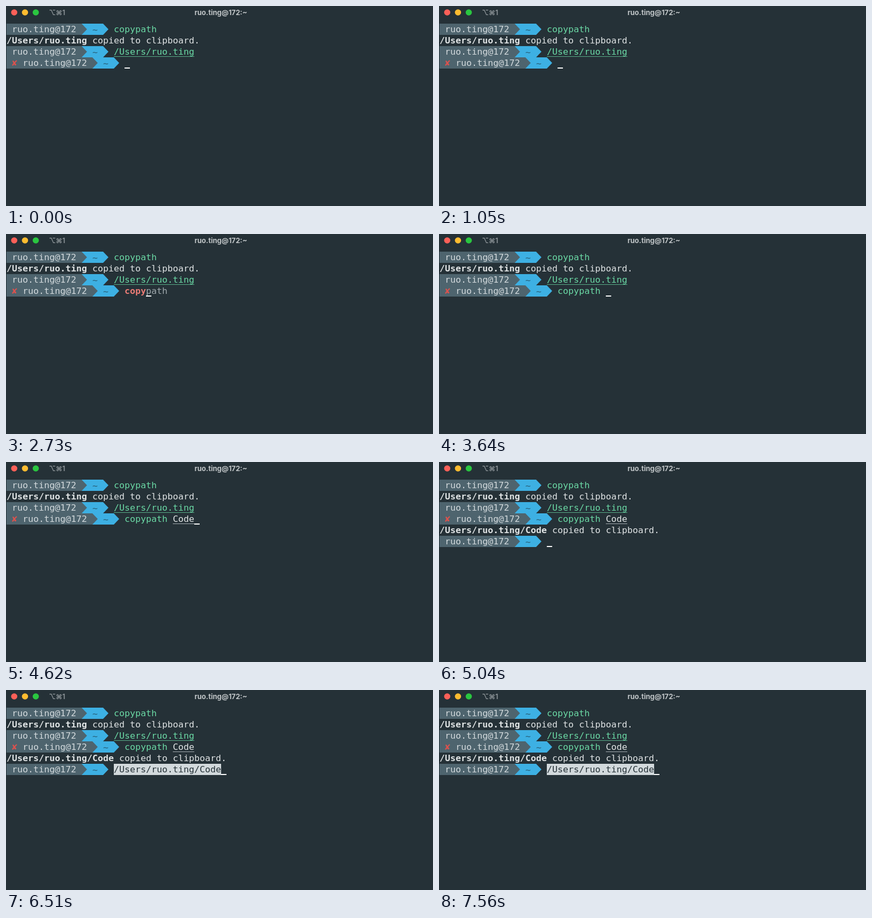
An HTML page for the animation above (7770 ms loop, 796 by 374 pixels).

```html
<!DOCTYPE html>
<html lang="en">
<head>
<meta charset="utf-8">
<title>Terminal</title>
<style>
  html, body { margin: 0; width: 100%; height: 100%; overflow: hidden; background: #253137; }
  svg { display: block; width: 796px; height: 374px; }
  text { white-space: pre; font: 16.61px "DejaVu Sans Mono", monospace; fill: #e0e4e5; }
  .bar { font: 600 12.5px Inter, sans-serif; fill: #92999d; }
  .title { font: 700 13px Inter, sans-serif; fill: #c0c5c7; text-anchor: middle; }
  .bold { font-weight: bold; }
  .user { fill: #d3dadd; }
  .home { fill: #285f78; }
  .fail { fill: #dc524e; }
  .ok { fill: #6bd9a5; }
  .bad { fill: #ea7b75; font-weight: bold; }
  .hint { fill: #9ea8ac; }
  .dark { fill: #253137; }
  .grey { fill: #4e646e; }
  .blue { fill: #3db0e3; }
  .light { fill: #d2d9dc; }
  .line { opacity: .75; }
  .cursor { fill: #fff; }
</style>
</head>
<body>
<svg id="screen" viewBox="0 0 796 374">
  <rect width="796" height="374" fill="#253137"/>
  <circle cx="15.3" cy="12" r="5.8" fill="#fc6058"/>
  <circle cx="35.4" cy="12" r="5.8" fill="#fdbc30"/>
  <circle cx="55.5" cy="12" r="5.8" fill="#2ac640"/>
  <text class="bar" x="80" y="16.5">⌥⌘1</text>
  <text class="title" id="title" x="400.5" y="16.5"></text>
</svg>
<script>
const LOOP = 7770, CELL = 10, LINE = 21;
const user = 'ruo.ting', host = user + '@172', path = '/Users/' + user;
const command = 'copypath', argument = 'Code', full = command + ' ' + argument;

// time of each keystroke
const keys = [2380, 2520, 2660, 2730, 3080, 3220, 3290, 3430, 3640, 4270, 4340, 4480, 4620];
const HINT = 2450, ENTER = 4900, OUTPUT = 4970, PROMPT = 5040, PASTE = 6510;

const screen = document.getElementById('screen');
const px = col => 1 + col * CELL;
const py = row => 33 + row * LINE;

function add(parent, tag, attrs, content = '') {
  const el = document.createElementNS('http://www.w3.org/2000/svg', tag);
  for (const name in attrs) el.setAttribute(name, attrs[name]);
  el.textContent = content;
  return parent.appendChild(el);
}
const group = () => add(screen, 'g', {});
const write = (g, row, col, content, style = '', baseline = 16) =>
  add(g, 'text', { x: px(col), y: py(row) + baseline, class: style }, content);
const box = (g, row, col, cols, style, top = 0, height = LINE) =>
  add(g, 'rect', { x: px(col), y: py(row) + top, width: cols * CELL, height, class: style });
const underline = (g, row, col, cols, style) => box(g, row, col, cols, style + ' line', 19, 1);

function arrow(g, row, from, to, style) {
  const y = py(row), x = px(to);
  add(g, 'path', { class: style, d: `M${px(from)} ${y}H${x}l10 10.5l-10 10.5H${px(from)}z` });
}
function prompt(g, row, failed) {
  const shift = failed ? 2 : 0, end = 14 + shift;
  arrow(g, row, end, end + 4, 'blue');
  arrow(g, row, 0, end, 'grey');
  if (failed) write(g, row, 1, '✘', 'fail');
  write(g, row, 1 + shift, host, 'user');
  write(g, row, end + 2, '~', 'home', 17);
}
function copied(g, row, dir) {
  write(g, row, 0, dir, 'bold');
  write(g, row, dir.length + 1, 'copied to clipboard.');
}

document.getElementById('title').textContent = host + ':~';

const history = group();
prompt(history, 0);
write(history, 0, 20, command, 'ok');
copied(history, 1, path);
prompt(history, 2);
write(history, 2, 20, path, 'ok');
underline(history, 2, 20, path.length, 'ok');
prompt(history, 3, true);

const word = write(history, 3, 22, '');
const hint = write(history, 3, 22, '', 'hint');
const arg = write(history, 3, 31, '');
const argLine = underline(history, 3, 31, 0, 'light');

const target = path + '/' + argument;
const output = group();
copied(output, 4, target);
const next = group();
prompt(next, 5);
const pasted = group();
box(pasted, 5, 20, target.length, 'light');
write(pasted, 5, 20, target, 'dark');

const cursor = box(screen, 0, 0, 1, 'cursor', 19, 2);

const show = (el, on) => el.setAttribute('visibility', on ? 'visible' : 'hidden');

function cursorCell(t, typed) {
  if (t < ENTER) return [3, 22 + typed];
  if (t < OUTPUT) return [4, 0];
  if (t < PROMPT) return [5, 0];
  return [5, t < PASTE ? 20 : 20 + target.length];
}

function draw(t) {
  const n = keys.filter(k => k <= t).length;
  const size = Math.min(n, command.length), argSize = Math.max(0, n - command.length - 1);
  word.textContent = command.slice(0, size);
  word.setAttribute('class', size < command.length ? 'bad' : 'ok');
  hint.textContent = t >= HINT ? command.slice(size) : '';
  hint.setAttribute('x', px(22 + size));
  arg.textContent = argument.slice(0, argSize);
  argLine.setAttribute('width', argSize * CELL);
  show(output, t >= OUTPUT);
  show(next, t >= PROMPT);
  show(pasted, t >= PASTE);
  const [row, col] = cursorCell(t, n);
  cursor.setAttribute('x', px(col));
  cursor.setAttribute('y', py(row) + 19);
}

function tick() {
  draw(performance.now() % LOOP);
  requestAnimationFrame(tick);
}
tick();
</script>
</body>
</html>
```
